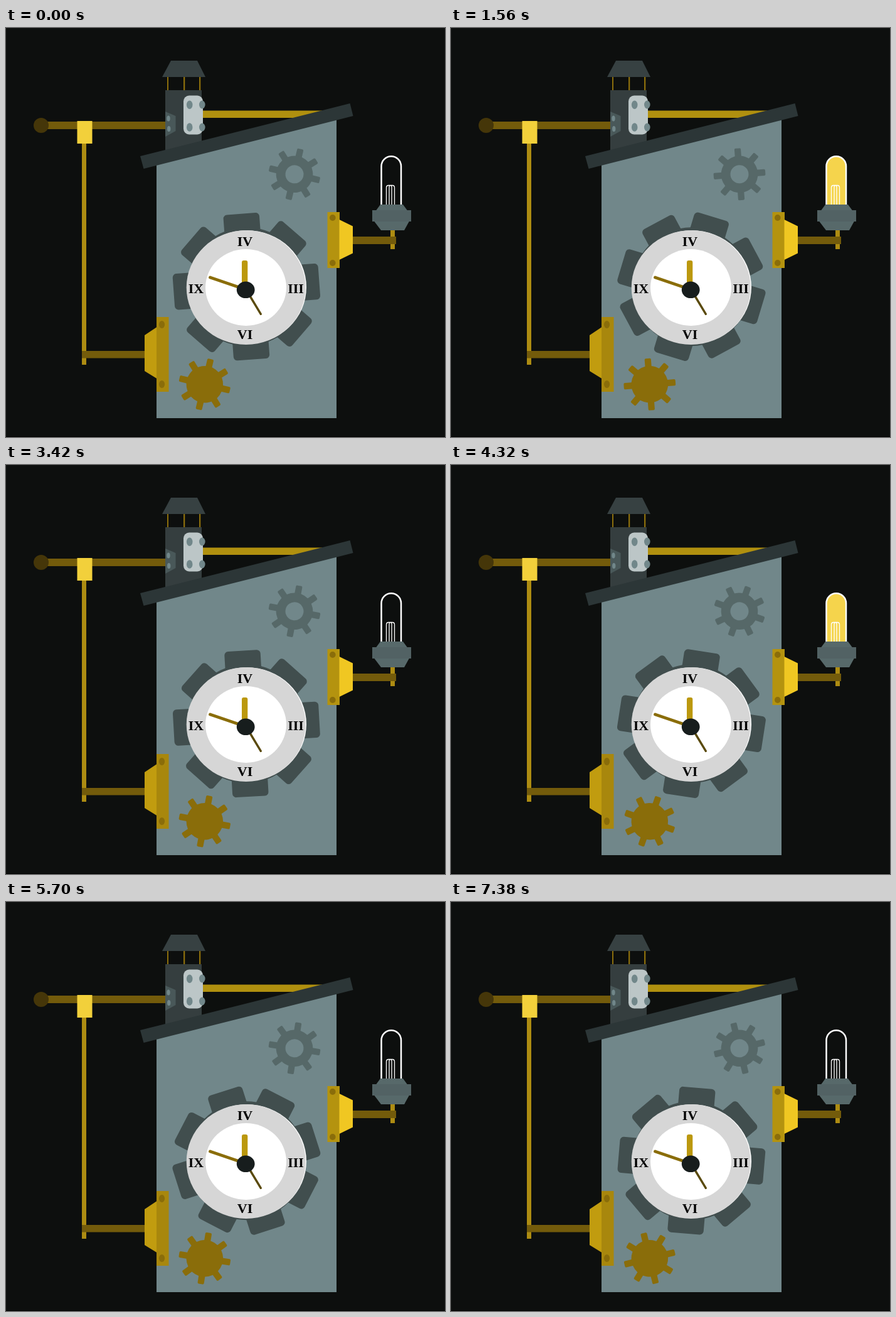
Recreate the animation shown at these times as an HTML page. Size 700 by 651 pixels, loop 7.44 s.

```html
<!DOCTYPE html>
<html lang="en">
<head>
<meta charset="utf-8">
<title>Clock house</title>
<style>
  html, body { margin: 0; width: 100%; height: 100%; overflow: hidden; background: #0d0f0e; }
  svg { display: block; width: 700px; height: 651px; }
  .wall { fill: #71878a; }
  .roof { fill: #2c3637; }
  .brass { fill: #ad8c12; }
  .rod { fill: #735b0b; }
  .bolt { fill: #8a6d0a; }
  .big { fill: #414e4e; }
  .grey { fill: #566868; }
  .cap { fill: #57696a; }
  .wire { fill: none; stroke: #fff; stroke-width: 1.3; }
  text { font: bold 22px "Liberation Serif", "Times New Roman", serif; text-anchor: middle; fill: #000; }
</style>
</head>
<body>
<svg viewBox="0 0 700 651">
  <rect width="700" height="651" fill="#0d0f0e"/>

  <!-- left pipework -->
  <rect class="rod" x="62" y="149" width="193" height="12"/>
  <circle cx="56" cy="155" r="12" fill="#453609"/>
  <rect class="brass" x="121" y="160" width="7" height="376"/>
  <rect x="113.5" y="148" width="24" height="36" fill="#f2d03b"/>
  <rect class="rod" x="121" y="514" width="101" height="11.5"/>

  <!-- chimney -->
  <g fill="#8a6d0c">
    <rect x="257" y="77" width="2" height="23"/>
    <rect x="283" y="77" width="2.3" height="23"/>
    <rect x="308" y="77" width="2.3" height="23"/>
  </g>
  <path fill="#374142" d="M263 52H305L318 78H249Z"/>
  <rect x="254" y="99" width="58" height="100" fill="#353e3f"/>
  <path fill="#495859" d="M254 133L270.500 140V164L254 173Z"/>
  <rect x="314" y="131.500" width="190" height="11.500" fill="#b0900f"/>
  <rect x="283" y="107.500" width="31" height="62" rx="9" fill="#bcc6c7"/>
  <g class="wall">
    <ellipse cx="259" cy="144" rx="2.700" ry="4.500"/>
    <ellipse cx="259.700" cy="160.500" rx="2.700" ry="4.500"/>
    <ellipse cx="292.700" cy="122.300" rx="4.800" ry="6.800"/>
    <ellipse cx="312.800" cy="122" rx="4.800" ry="6.500"/>
    <ellipse cx="292.700" cy="158" rx="4.800" ry="6.800"/>
    <ellipse cx="312.800" cy="158" rx="4.800" ry="6.500"/>
  </g>

  <!-- house -->
  <path class="wall" d="M240 210L527 140V621H240Z"/>
  <path class="roof" d="M214 204L548.500 120L553.500 140L219.500 224Z"/>

  <g id="gears"></g>

  <!-- dial -->
  <ellipse cx="384" cy="412.500" rx="95" ry="90.500" fill="#fff"/>
  <ellipse cx="382.700" cy="413" rx="95" ry="91" fill="#d6d6d6"/>
  <ellipse cx="382.500" cy="413" rx="64.500" ry="61" fill="#fff"/>
  <text x="381" y="346.500">IV</text>
  <text x="462" y="422">III</text>
  <text x="381" y="494.500">VI</text>
  <text x="303" y="422">IX</text>
  <rect x="376" y="370" width="9.300" height="38" rx="3" fill="#bb980f"/>
  <g stroke-linecap="round">
    <path d="M325.500 397L374 413.500" stroke="#8a6d0a" stroke-width="4.800"/>
    <path d="M388 425L406.300 455.300" stroke="#5a4a0c" stroke-width="3.400"/>
  </g>
  <ellipse cx="382.200" cy="416.800" rx="14.400" ry="13.300" fill="#171d1d"/>

  <!-- left bracket -->
  <path fill="#c19c0f" d="M221 489L240.500 476V558L221 546Z"/>
  <rect x="240" y="460" width="19.500" height="119" fill="#a8870d"/>
  <ellipse class="bolt" cx="248.500" cy="472" rx="4.600" ry="6"/>
  <ellipse class="bolt" cx="248.500" cy="567" rx="4.600" ry="6"/>

  <!-- right bracket -->
  <rect x="512.500" y="293" width="19.500" height="89" fill="#b4930f"/>
  <ellipse class="bolt" cx="520.800" cy="302" rx="4.800" ry="5"/>
  <ellipse class="bolt" cx="520.800" cy="374" rx="4.800" ry="5"/>
  <path fill="#f0c722" d="M531.500 305L553 315.500V358.500L531.500 369Z"/>
  <rect class="brass" x="613" y="320" width="7" height="32"/>
  <rect class="rod" x="553" y="332" width="69" height="12"/>

  <!-- lamp -->
  <path id="bulb" fill="none" stroke="#fff" stroke-width="2.500" d="M598.500 283V220A15.750 15.750 0 0 1 630 220V283"/>
  <path class="wire" d="M606.500 282V254Q606.500 250.500 610 250.500H616Q619.500 250.500 619.500 254V282M611 282V253.500Q611 250.500 613 250.500T615 253.500V282"/>
  <path class="cap" d="M597 281H633L640 290.500H590Z"/>
  <path class="cap" d="M587 307.500H643L635 322H598Z"/>
  <rect x="584" y="290" width="62" height="18" fill="#526264"/>

  <rect y="650" width="700" height="1" fill="#000"/>
</svg>
<script>
const LOOP = 7440, STEP = 60, BLINK = 2310;

// speed in degrees per second, start in degrees from upright
const gears = [
  { cls: 'grey', x: 460, y: 232.8, body: 29.3, tip: 41.3, tooth: 10.2, round: 2, hole: 14.5, start: 13.4, speed: -40.25 },
  { cls: 'bolt', x: 316.8, y: 567.2, body: 29.3, tip: 41.3, tooth: 10.2, round: 2, hole: 0, start: 13.4, speed: -40.25 },
  { cls: 'big', x: 383.4, y: 411.7, body: 94.5, tip: 116.3, tooth: 57.5, round: 6, hole: 0, start: -4.2, speed: 13.42 }
];

function gearMarkup(g) {
  let teeth = '';
  for (let i = 0; i < 8; i++) {
    teeth += `<rect x="${-g.tooth / 2}" y="${-g.tip}" width="${g.tooth}" height="${g.tip * 0.5}" rx="${g.round}" transform="rotate(${i * 45})"/>`;
  }
  const hole = g.hole ? `<circle class="wall" r="${g.hole}"/>` : '';
  return `<g class="${g.cls}">${teeth}<circle r="${g.body}"/>${hole}</g>`;
}

const layer = document.getElementById('gears');
const bulb = document.getElementById('bulb');
layer.innerHTML = gears.map(gearMarkup).join('');

function draw(t) {
  gears.forEach((g, i) => {
    const angle = g.start + g.speed * t / 1000;
    layer.children[i].setAttribute('transform', `translate(${g.x} ${g.y}) rotate(${angle})`);
  });
  const lit = t % BLINK >= BLINK / 2;
  bulb.setAttribute('fill', lit ? '#f5d44c' : 'none');
}

const origin = performance.now();
function tick() {
  const t = (performance.now() - origin) % LOOP;
  draw(Math.floor(t / STEP) * STEP);
  requestAnimationFrame(tick);
}
draw(0);
requestAnimationFrame(tick);
</script>
</body>
</html>
```
